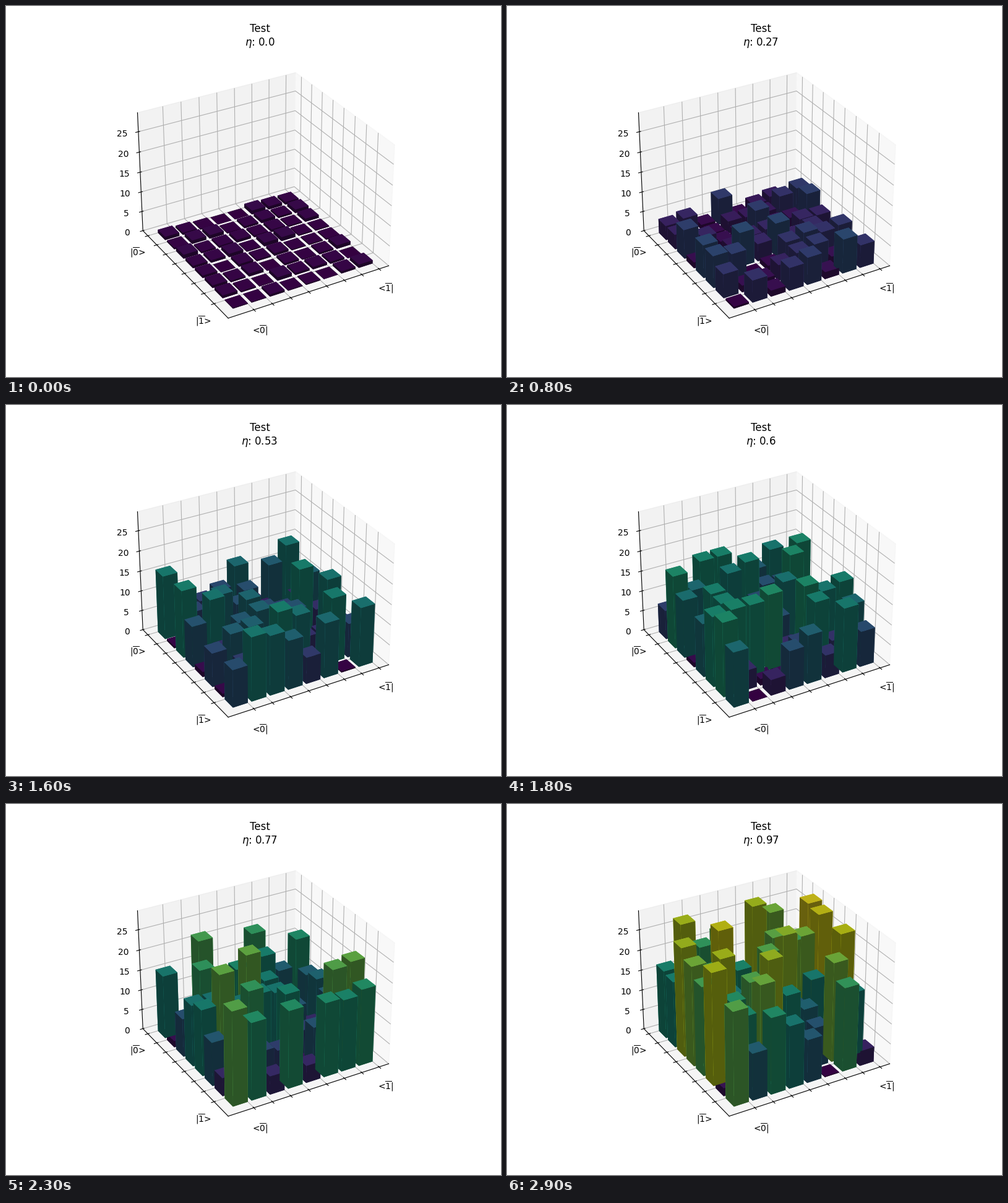
Recreate the animation shown at these times as a matplotlib script. Size 800 by 600 pixels, loop 3 s.

```python
import numpy as np
import matplotlib.pyplot as plt
from matplotlib.animation import FuncAnimation

N = 8            # bars per side
STEPS = 30       # frames in one loop
TOP = 29.6       # top of the z axis and of the colour scale
WIDTH = 0.8
PAD = 0.56875    # free floor around the bars

# Every step draws fresh random heights under a ceiling that rises evenly.
rng = np.random.default_rng(7)
ceilings = TOP * np.arange(1, STEPS + 1) / STEPS
heights = rng.random((STEPS, N * N)) * ceilings[:, None]

xs, ys = (g.ravel() for g in np.meshgrid(range(N), range(N), indexing="ij"))


def end_labels(first, last):
    return [first] + [""] * (N - 2) + [last]


fig = plt.figure(figsize=(8, 6), dpi=100)
ax = fig.add_subplot(projection="3d")
ax.view_init(elev=30, azim=60)
ax.set_xlim(-PAD, N - 1 + WIDTH + PAD)
ax.set_ylim(-PAD, N - 1 + WIDTH + PAD)
ax.set_zlim(0, TOP)
ax.set_xticks(range(N), end_labels(r"<$\overline{1}$|", r"<$\overline{0}$|"))
ax.set_yticks(range(N), end_labels(r"|$\overline{0}$>", r"|$\overline{1}$>"))
ax.set_zticks(range(0, STEPS, 5))


def draw(step):
    for old in list(ax.collections):
        old.remove()
    h = heights[step]
    ax.bar3d(xs, ys, np.zeros(N * N), WIDTH, WIDTH, h,
             color=plt.cm.viridis(h / TOP))
    ax.set_title(f"Test\n$\\eta$: {round(step / STEPS, 2)}")
    return []


anim = FuncAnimation(fig, draw, frames=STEPS, interval=100,
                     init_func=lambda: draw(0), repeat=True, repeat_delay=0)
plt.show()
```
